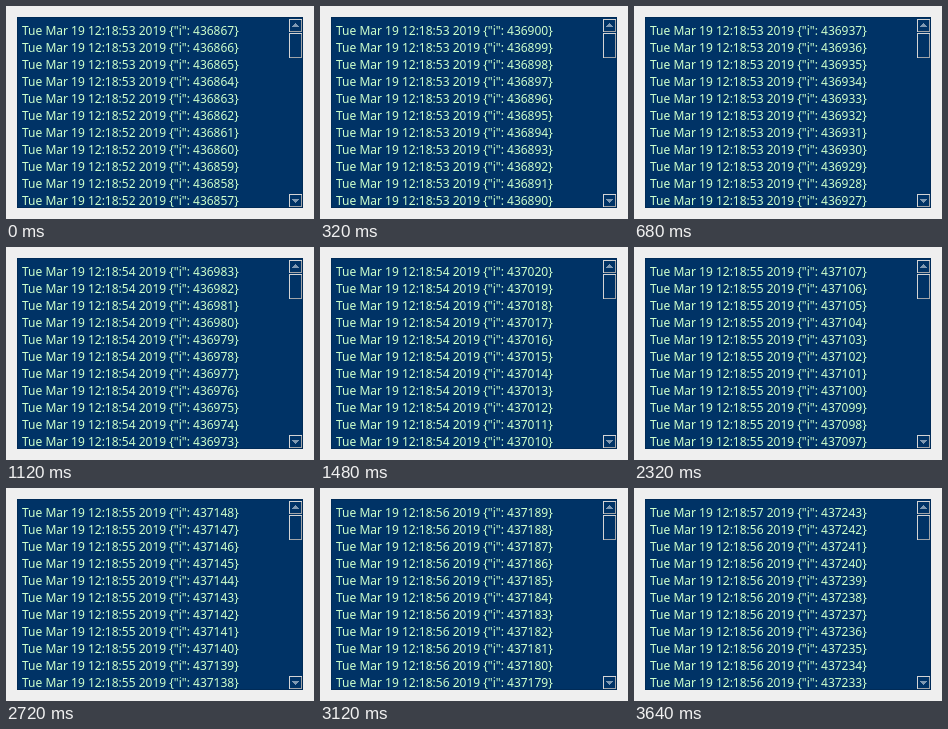
An HTML page that plays this animation: 308x213 px, repeating every 3.67 s.

```html
<!DOCTYPE html>
<html lang="en">
<head>
<meta charset="utf-8">
<title>Event log</title>
<style>
  html, body { margin: 0; width: 100%; height: 100%; overflow: hidden; background: #efefef; }
  #panel {
    position: absolute; left: 11px; top: 11px; width: 286px; height: 191px;
    box-sizing: border-box; border: 1px solid #002b57; background: #036;
  }
  #log {
    position: absolute; left: 16px; top: 16px; margin: 0;
    font: 12px/17px "Noto Sans", sans-serif; color: #cfc; white-space: pre;
  }
  svg { position: absolute; left: 0; top: 0; }
</style>
</head>
<body>
<div id="panel"></div>
<pre id="log"></pre>
<svg width="308" height="213" shape-rendering="crispEdges">
  <defs>
    <g id="button">
      <path d="M.5 12.5V.5H12.5" fill="none" stroke="#d4d4d4"/>
      <path d="M.5 12.5H12.5V.5" fill="none" stroke="#a0a4a8"/>
    </g>
  </defs>
  <use href="#button" x="283" y="13"/>
  <use href="#button" x="283" y="188"/>
  <path d="M283.5 51.5V27.5H295.5" fill="none" stroke="#d4d4d4"/>
  <path d="M283.5 51.5H295.5V27.5" fill="none" stroke="#a0a4a8"/>
  <path d="M286 21h7l-3.5-4zM286 193h7l-3.5 4z" fill="#7f99b2"/>
</svg>
<script>
  const LOOP = 3670, STEP = 40, ROWS = 11;
  const FIRST = 436867, PER_STEP = 4.132;
  const SECOND_START = 436864, PER_SECOND = 94.75;
  const log = document.getElementById("log");

  function entry(i) {
    const second = 53 + Math.floor((i - SECOND_START) / PER_SECOND);
    return `Tue Mar 19 12:18:${second} 2019 {"i": ${i}}`;
  }

  function draw(now) {
    const step = Math.floor((now % LOOP) / STEP);
    const newest = FIRST + Math.round(step * PER_STEP);
    log.textContent = Array.from({ length: ROWS }, (_, row) => entry(newest - row)).join("\n");
    requestAnimationFrame(draw);
  }
  draw(0);
</script>
</body>
</html>
```
